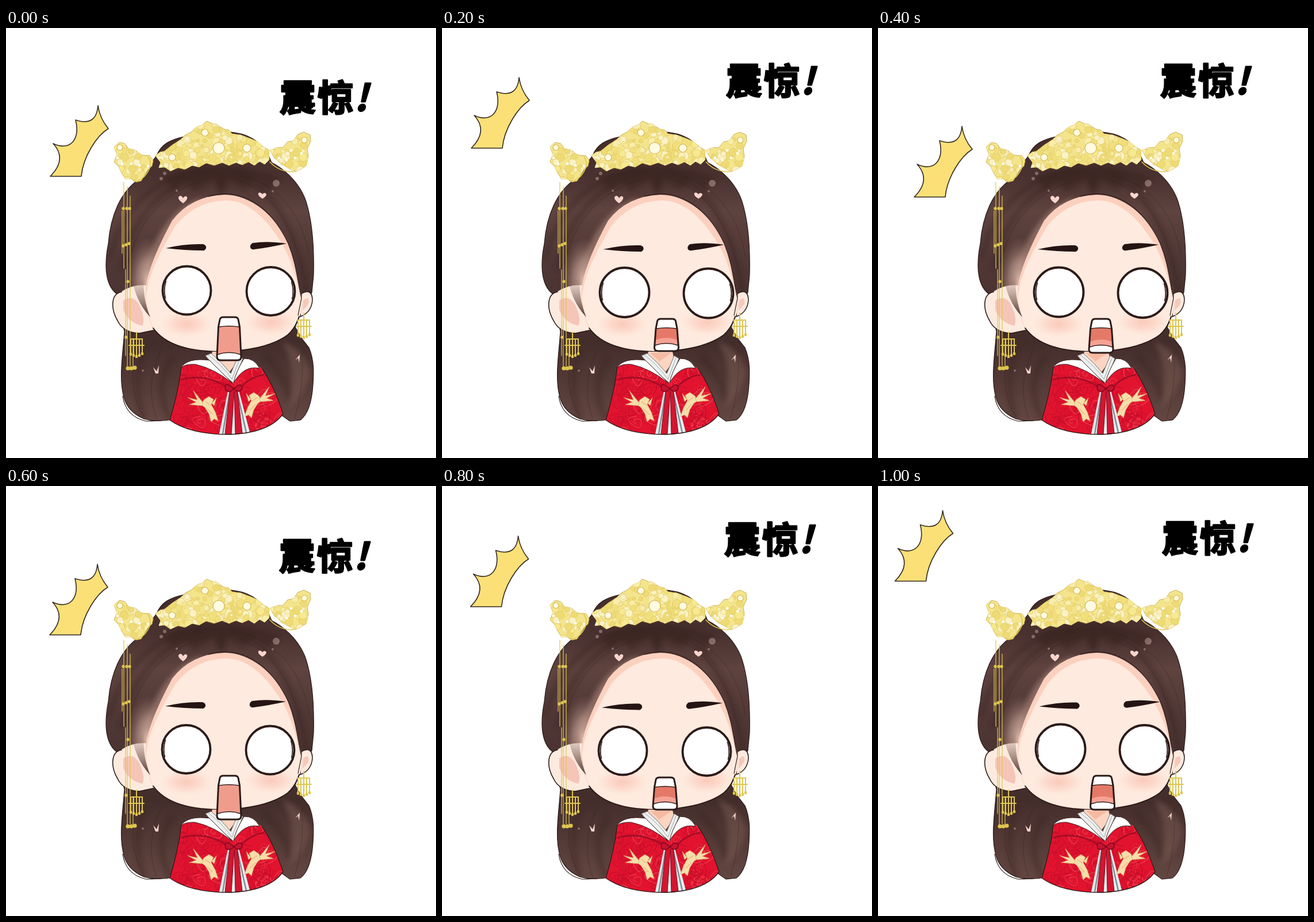
These frames come from a looping animation (748x748 px, 1200 ms). An HTML page:

```html
<!DOCTYPE html>
<html lang="zh">
<head>
<meta charset="utf-8">
<style>
html, body { margin: 0; width: 100%; height: 100%; overflow: hidden; background: #fff; }
svg { display: block; width: 100%; height: 100%; }
text { font: 900 63px "Noto Sans CJK SC", "Noto Sans CJK", sans-serif; stroke: #000; stroke-width: 2.6; stroke-linejoin: round; }
.bang { font-style: italic; }
.line { fill: none; stroke: #2b1a18; stroke-linecap: round; stroke-linejoin: round; }
.line:not([stroke-width]) { stroke-width: 2; }
.gold { fill: none; stroke: #dfc64f; stroke-linecap: round; }
</style>
</head>
<body>
<svg viewBox="0 0 748 748">
<defs>
  <linearGradient id="hair" x1="0" y1="180" x2="0" y2="690" gradientUnits="userSpaceOnUse">
    <stop offset="0" stop-color="#432e2d"/><stop offset=".15" stop-color="#49312f"/>
    <stop offset=".27" stop-color="#5e433f"/><stop offset=".45" stop-color="#4f3735"/>
    <stop offset=".72" stop-color="#432d2b"/><stop offset="1" stop-color="#654843"/>
  </linearGradient>
  <linearGradient id="lock" x1="0" y1="430" x2="0" y2="500" gradientUnits="userSpaceOnUse">
    <stop offset="0" stop-color="#8c6a60" stop-opacity="0"/><stop offset="1" stop-color="#5b403b"/>
  </linearGradient>
  <radialGradient id="fade"><stop offset="0" stop-color="#e0bdae"/><stop offset=".5" stop-color="#b28f84" stop-opacity=".7"/><stop offset="1" stop-color="#8a685f" stop-opacity="0"/></radialGradient>
  <radialGradient id="blush"><stop offset="0" stop-color="#f9bfae"/><stop offset=".5" stop-color="#fbcbbc" stop-opacity=".7"/><stop offset="1" stop-color="#fdd9cb" stop-opacity="0"/></radialGradient>
  <filter id="soft" x="-20%" y="-20%" width="140%" height="140%"><feGaussianBlur stdDeviation="4"/></filter>
  <path id="headShape" d="M262 222C270 202 286 194 310 189Q350 174 398 182C430 186 452 206 462 234C490 248 514 276 522 302C534 340 536 390 535 430L532 460 512 498 503 520 513 538 527 556C537 580 535 604 534 620Q531 668 512 682L494 684 480 674 290 681Q262 686 240 680Q211 667 205 642C196 610 203 570 206 528L192 462C170 445 172 405 178 375C182 325 200 285 230 264Z"/>
  <path id="coatShape" d="M305 588Q330 574 362 584L393 616 404 584Q430 580 445 592Q466 622 482 671C465 695 430 706 385 707C345 707 308 699 285 682Q300 632 305 588Z"/>
  <path id="crownShape" d="M260 222L268 216 276 214 290 203 304 194 312 186 322 181 332 172 342 168 349 162 358 166 366 167 379 176 387 177 393 184 408 186 424 192 438 198 448 207 457 212 458 229 450 237 441 232 432 239 422 233 411 238 400 234 388 239 376 234 362 239 348 235 336 242 324 239 311 246 299 243 286 249 276 242 266 243 269 234Z"/>
  <path id="leftShape" d="M188 207L197 199 207 201 213 210 224 212 236 221 250 222 256 230 254 240 247 246 240 258 235 266 226 268 217 262 208 263 200 250 196 241 188 233 193 220Z"/>
  <path id="rightShape" d="M459 213L470 208 481 208 490 198 500 196 508 185 518 181 529 186 530 197 524 210 526 224 522 240 512 246 503 250 492 244 479 237 467 226Z"/>
  <clipPath id="headClip"><use href="#headShape"/></clipPath>
  <clipPath id="coatClip"><use href="#coatShape"/></clipPath>
  <clipPath id="crownClip"><use href="#crownShape"/></clipPath>
  <clipPath id="leftClip"><use href="#leftShape"/></clipPath>
  <clipPath id="rightClip"><use href="#rightShape"/></clipPath>
</defs>

<!-- hair -->
<use href="#headShape" fill="url(#hair)" stroke="#2b1a18" stroke-width="1.2"/>
<path class="line" stroke-width="1.2" d="M203 640Q208 676 244 684L270 683"/>
<g clip-path="url(#headClip)">
  <g fill="none" stroke="#35211f" stroke-width="8" opacity=".4" filter="url(#soft)">
    <path d="M368 248C300 262 225 300 200 420M350 246C280 250 205 300 180 400M376 248L375 290M385 248C440 258 505 320 524 470M240 560Q218 620 240 680M290 575Q255 620 285 680M450 570Q490 610 494 650"/>
  </g>
  <path d="M275 262Q370 218 478 262L455 281 436 263 414 280 386 265 374 287 360 265 328 285 312 267 290 281Z" fill="#38231f" opacity=".5" filter="url(#soft)"/>
  <path d="M480 545Q520 560 530 600Q515 650 490 660Q510 600 480 545Z" fill="#7a5b53" opacity=".5" filter="url(#soft)"/>
  <path d="M345 296C300 304 262 350 240 420L262 410Q290 340 345 296Z" fill="#a07d72" opacity=".7" filter="url(#soft)"/>
  <ellipse cx="247" cy="440" rx="38" ry="76" fill="url(#fade)"/>
  <path class="line" stroke-width="1" opacity=".35" d="M350 262C275 285 225 330 205 440M405 265C460 285 500 340 517 430M420 258C475 280 515 320 528 400M226 560Q210 630 240 676M270 560Q240 620 262 680M515 560Q520 620 502 680"/>
</g>

<!-- ears and face -->
<path d="M200 459C182 462 182 489 194 509Q204 530 232 531L258 525 248 448Q222 444 200 459Z" fill="#fdeadf"/>
<path class="line" stroke-width="1.6" d="M201 459C182 462 182 489 194 509Q204 530 232 531L256 526"/>
<path d="M204 474Q225 460 236 492Q242 510 237 518Q212 512 204 490Z" fill="#f3b9aa" opacity=".75"/>
<path d="M514 462Q533 452 533 474Q531 495 512 502Z" fill="#fdeadf" stroke="#2b1a18" stroke-width="1.5"/>
<path d="M517 474Q528 464 526 480L516 492Z" fill="#f3b9aa" opacity=".7"/>
<path d="M380 290C425 290 469 325 491 375C506 412 507 442 515 470C518 492 508 516 490 534C460 556 410 563 370 563C310 562 275 548 256 522Q246 505 243 470C238 440 262 385 289 335Q322 292 380 290Z" fill="#fcd0be"/>
<path d="M380 300C420 298 454 332 480 375C500 410 506 442 514 470C517 492 507 516 490 533C460 555 410 562 370 562C310 561 275 547 257 522Q247 505 244 470C244 435 267 392 294 345Q328 302 380 300Z" fill="#feeade"/>
<path d="M218 425Q222 472 251 503Q237 470 240 430Z" fill="url(#lock)"/>
<path class="line" d="M256 522C275 548 310 562 370 563C410 563 460 556 490 534Q503 523 510 502"/>
<path class="line" stroke-width="1.2" d="M352 293Q372 287 392 289Q455 299 491 375C506 412 507 442 514 470L508 500"/>
<g opacity=".75">
  <ellipse cx="314" cy="515" rx="44" ry="23" fill="url(#blush)"/>
  <ellipse cx="461" cy="512" rx="44" ry="23" fill="url(#blush)"/>
</g>
<g fill="#f8d5cd">
  <path d="M308 305Q297 297 301 293Q305 290 308 296Q312 290 315 294Q317 298 308 305Z"/>
  <path d="M446 297Q437 291 439 287Q443 285 446 289Q450 285 453 289Q453 293 446 297Z"/>
  <path d="M256 590L262 597 266 587 265 601 260 601ZM503 578L511 568 510 582 508 574Z"/>
  <g opacity=".35"><circle cx="470" cy="270" r="6"/><circle cx="276" cy="253" r="3"/><circle cx="270" cy="262" r="3"/><circle cx="464" cy="284" r="2"/><circle cx="297" cy="283" r="2"/><circle cx="238" cy="596" r="2"/></g>
</g>

<!-- neck and robe -->
<path d="M359 563L401 563 404 578 386 602 355 578Z" fill="#fbd5c2"/>
<path d="M362 565H400L378 580Z" fill="#f3a98f" opacity=".6"/>
<use href="#coatShape" fill="#e2132e"/>
<g id="swirls" clip-path="url(#coatClip)" fill="none" stroke-width="1.6"></g>
<path d="M347 570L357 566Q377 583 391 601L404 570 412 575 396 618Q366 594 347 570Z" fill="#edf0ef" stroke="#77706e" stroke-width="1"/>
<path class="line" stroke-width="1" opacity=".35" d="M352 569Q376 586 393 611L407 574"/>
<path d="M304 591Q316 573 354 578L394 618Q362 592 329 585Q312 584 304 591ZM396 617Q399 600 414 575Q432 574 441 592Q414 586 396 617Z" fill="#fff" stroke="#3a2321" stroke-width="1"/>
<path d="M305 612Q345 600 382 623M408 625Q425 607 449 603" fill="none" stroke="#a80d26" stroke-width="3"/>
<path d="M387 627L371 706Q398 710 424 703L404 627Z" fill="#e8efee"/>
<path d="M390 628L377 706M401 628L418 704" fill="none" stroke="#7b9094" stroke-width="2.5"/>
<path d="M390 626L381 706 392 707 397 632 399 707 411 705 402 626Z" fill="#d31530" stroke="#840b20"/>
<path d="M396 627Q378 612 382 630Q388 636 396 628Q410 614 411 627Q405 637 396 627Z" fill="#c51431" stroke="#7d081d" stroke-width="1.5"/>
<g id="crane" fill="#f5deab" stroke="#d9b06a" stroke-width=".7">
  <path d="M344 647L353 641 361 646 357 655 364 668 369 683 362 680 357 685 353 671 346 660 340 656Z"/>
  <path d="M343 652L326 631 333 647 316 643 331 651 319 655 341 657ZM358 653L366 643 362 657Z"/>
  <path d="M350 662L360 672M347 650L356 656" stroke="#e77b46"/>
</g>
<use href="#crane" transform="matrix(-1 0 0 1 784 -7)"/>
<path class="line" stroke-width="1.3" d="M305 590Q300 632 285 682C308 699 345 707 385 707C430 706 465 695 482 671Q466 622 445 592"/>

<!-- crown and jewellery -->
<g id="jewels"></g>
<path class="gold" stroke-width="1.6" d="M247 224Q258 239 240 259Q231 267 222 266M459 233Q476 251 500 250"/>
<g id="tassels" class="gold" stroke-width="1.2">
  <path d="M205 268V418M211 276V592M216 292V588M202 318V392M208 420V570M221 540V590"/>
</g>
<g id="earring" class="gold">
  <path d="M227 529V570M217 541H237V566M217 541V567M222 541V569M232 541V569M214 552H240" stroke-width="2"/>
  <path d="M217 567v1M222 569v1M227 571v1M232 569v1M237 566v1" stroke-width="4.5"/>
</g>
<use href="#earring" transform="translate(291 -33)"/>

<!-- moving parts -->
<g id="brows" fill="#241413">
  <path d="M278 383Q310 375 343 376Q349 378 348 383Q346 388 341 387Q312 387 278 383Z"/>
  <path d="M488 375Q455 370 429 374Q424 377 425 382Q427 386 432 385Q457 382 488 375Z"/>
</g>
<g id="eyes" stroke="#2b1a18" stroke-width="3.8"></g>
<g id="mouth"></g>
<path id="burst" d="M160 135Q163 157 178 175C158 187 134 224 131 258L77 258Q107 228 82 201C111 215 130 194 121 160Q157 172 160 135Z" fill="#fae077" stroke="#342a22" stroke-width="1.6" stroke-linejoin="round"/>
<text id="word" x="476 542 606" y="144">震惊<tspan class="bang">!</tspan></text>
</svg>
<script>
const el = id => document.getElementById(id);
const move = (id, [x, y]) => el(id).setAttribute('transform', `translate(${x} ${y})`);

let seed = 7;
const rand = (a, b) => {
  seed = (seed * 16807) % 2147483647;
  return a + (b - a) * seed / 2147483647;
};
const pick = list => list[Math.floor(rand(0, list.length))];
const disc = (x, y, r, fill, extra = '') => `<circle cx="${x}" cy="${y}" r="${r}" fill="${fill}" ${extra}/>`;

// Beaded gold ornament clipped to its shape
function beads(name, x0, y0, x1, y1, count) {
  let out = `<use href="#${name}Shape" fill="#f4e58c" stroke="#cbb052" stroke-width="1"/><g clip-path="url(#${name}Clip)">`;
  for (let i = 0; i < count; i++) {
    const fill = pick(['#f8edaa', '#f1df7c', '#f7e990', '#faf2c4', '#eedb74']);
    out += disc(rand(x0, x1).toFixed(1), rand(y0, y1).toFixed(1), rand(2.5, 8).toFixed(1), fill, 'stroke="#e2cb6c" stroke-width=".8"');
  }
  return out + '</g>';
}
const pearl = (x, y, r) => disc(x, y, r, '#fffbe2', 'stroke="#d8b956" stroke-width="1.2"');
el('jewels').innerHTML =
  beads('left', 188, 199, 264, 268, 60) + beads('right', 459, 182, 530, 250, 60) + beads('crown', 260, 164, 458, 248, 220) +
  pearl(370, 209, 10) + pearl(419, 209, 7) + pearl(346, 182, 6) + pearl(289, 225, 6) + pearl(198, 208, 5) + pearl(519, 195, 5) +
  [[194, 226], [202, 237], [218, 236], [232, 239], [247, 240], [475, 226], [488, 230], [503, 226], [514, 218], [496, 213]]
    .map(([x, y]) => disc(x, y, 2.3, '#fff')).join('');

el('tassels').innerHTML += [[204, 314], [210, 314], [215, 314], [204, 379], [209, 377], [214, 375], [212, 441], [209, 538], [212, 592], [218, 592], [224, 591]]
  .map(([x, y]) => disc(x, y, y > 580 ? 3.6 : 2.7, '#dfc64f', 'stroke="none"')).join('');

// Rose-like curls on the cloth
let curls = '';
for (let i = 0; i < 85; i++) {
  const x = rand(284, 482), y = rand(584, 704), r = rand(5, 12), a = rand(0, 360);
  curls += `<path transform="translate(${x} ${y}) rotate(${a}) scale(${r / 10})" d="M0 0q5-4 5 2t-9 3t-2-13t16 8t-14 10" stroke="${pick(['#bd0d29', '#f34a58', '#c60e2d'])}" opacity=".6"/>`;
}
el('swirls').innerHTML = curls;

function drawEyes([x, y, r]) {
  const eye = (cx, cy, side) => {
    const ex = cx + side * (r - 4);
    return disc(cx, cy, r, '#fff') +
      `<path d="M${ex - side * 2} ${cy - 17}Q${ex + side * 3} ${cy} ${ex - side} ${cy + 14}" fill="none" stroke-width="1.6"/>`;
  };
  el('eyes').innerHTML = eye(x, y, -1) + eye(x + 146, y + 1.5, 1);
}

function drawMouth([x, y, h]) {
  move('mouth', [x, y]);
  const shape = `M-10 1H10Q15 1 16 5L18.5 18 21 ${h - 7}Q21 ${h - 1} 14 ${h - 1}H-14Q-21 ${h - 1} -21 ${h - 7}L-18.5 18 -16 5Q-15 1 -10 1Z`;
  const b = h - 11, tall = h > 70;
  const lower = `L20.5 ${b}Q0 ${b - 7} -20.5 ${b}Z`;
  el('mouth').innerHTML = `<path d="${shape}" fill="#fff"/>
    <path d="M-18 18Q0 15 18 18${lower}" fill="${tall ? '#f09c8d' : '#e57968'}"/>
    ${tall ? '' : `<path d="M-19.5 ${b - 9}Q0 ${b - 17} 19.5 ${b - 9}${lower}" fill="#f5a294"/>`}
    <path class="line" stroke-width="1.4" d="M-18 18Q0 15 18 18M-20 ${b}Q0 ${b - 7} 20 ${b}"/>
    <path class="line" stroke-width="3" d="${shape}"/>`;
}

const STEP = 200;
const poses = [
  { word: [0, 0], burst: [0, 0], brows: [0, 0], eyes: [314.5, 456.5, 42], mouth: [388, 502, 77] },
  { word: [18, -29], burst: [-26, -49], brows: [2.5, 2], eyes: [317.5, 460, 43], mouth: [390.5, 505, 58] },
  { word: [15, -29], burst: [-14, 36], brows: [0, 2], eyes: [314.5, 459.5, 43], mouth: [388, 505, 61] },
  { word: [-1, 1], burst: [-1, 1], brows: [-1, 0], eyes: [313.5, 458, 42], mouth: [388, 503, 78] },
  { word: [15, -28], burst: [-27.5, -48], brows: [0, 2.5], eyes: [314.5, 460.5, 42], mouth: [388, 506, 58] },
  { word: [18, -30], burst: [-47.5, -92.5], brows: [2.5, 0.5], eyes: [317.5, 457.5, 43], mouth: [390.5, 503, 61] }
];

let shown = -1;
function tick() {
  const i = Math.floor(performance.now() / STEP) % poses.length;
  if (i !== shown) {
    shown = i;
    const p = poses[i];
    for (const id of ['word', 'burst', 'brows']) move(id, p[id]);
    drawEyes(p.eyes);
    drawMouth(p.mouth);
  }
  requestAnimationFrame(tick);
}
tick();
</script>
</body>
</html>
```
